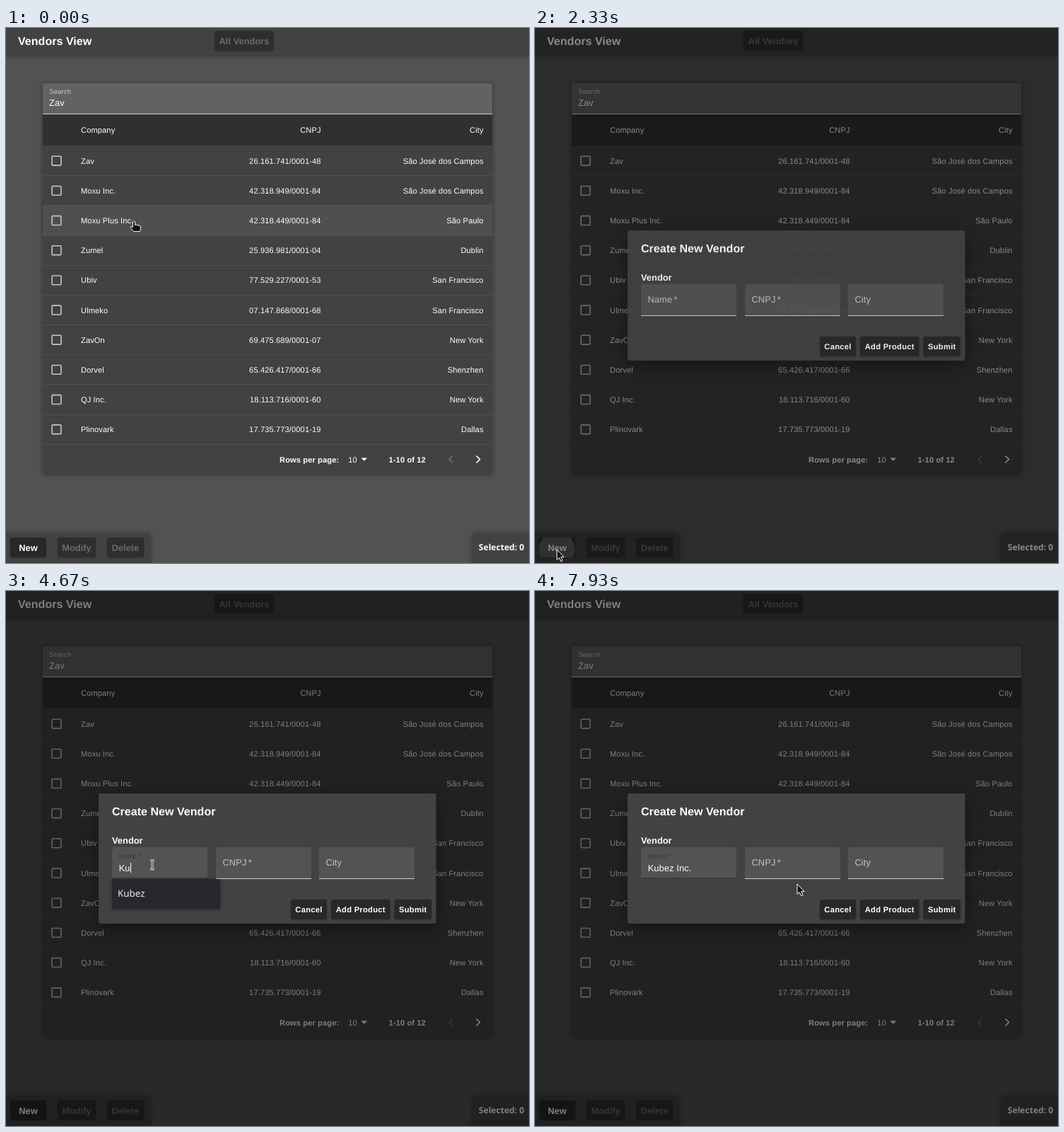
Animation of 740 by 756 pixels, one loop 8000 ms. Source, as an HTML page:

```html
<!DOCTYPE html>
<html lang="en">
<head>
<meta charset="utf-8">
<title>Vendors View</title>
<style>
html, body { margin: 0; width: 100%; height: 100%; overflow: hidden; background: #525252; }
svg { display: block; width: 740px; height: 756px; }
text {
  font-family: "Liberation Sans", Arial, sans-serif;
  font-size: 11.1px; letter-spacing: .12px; fill: #fff;
  text-rendering: geometricPrecision; white-space: pre;
}
.end { text-anchor: end; }
.mid { text-anchor: middle; }
.bold { font-weight: 700; }
.title { font-size: 16px; font-weight: 700; letter-spacing: .04px; }
.input { font-size: 12.8px; }
.small { font-size: 9.6px; fill: #cbcbcb; }
.big { font-size: 12.8px; font-weight: 700; letter-spacing: .04px; }
.act { font-size: 11.2px; font-weight: 700; letter-spacing: .27px; }
.off { fill: #6b6b6b; }
.count { font: 600 12.1px "Noto Sans", sans-serif; letter-spacing: 0; }
.list text { font: 13.4px "Noto Sans", sans-serif; letter-spacing: 0; fill: #ececec; }
.panel { fill: #424242; filter: drop-shadow(0 1px 3px rgba(0,0,0,.4)); }
.dialog { fill: #424242; filter: drop-shadow(0 7px 12px rgba(0,0,0,.4)); }
.btn { fill: #282828; filter: drop-shadow(0 1px 1px rgba(0,0,0,.2)); }
.btn.dim { fill: #2e2e2e; }
.box { fill: none; stroke: #c6c6c6; stroke-width: 1.6; }
.pop { fill: #26282d; filter: drop-shadow(0 1px 2px rgba(0,0,0,.4)); }
</style>
</head>
<body>
<svg viewBox="0 0 740 756" xmlns="http://www.w3.org/2000/svg">
  <defs><clipPath id="newClip"><rect x="6" y="720" width="51" height="28" rx="3"/></clipPath></defs>
  <rect width="740" height="756" fill="#525252"/>
  <g id="page"></g>
  <g clip-path="url(#newClip)"><circle id="ripple" cx="31" cy="737" fill="#fff"/></g>
  <text class="big mid" x="31.5" y="738.6">New</text>
  <rect id="shade" width="740" height="756"/>
  <g id="modal"></g>
  <g id="list" class="list"></g>
  <g id="cursor">
    <path id="arrow" d="M0,0V14.5L3.3,11.6 5.6,16.8 8,15.8 5.8,10.6H10Z" fill="#111" stroke="#fff" stroke-linejoin="round"/>
    <path id="hand" d="M-1.6,1Q0,-1.4 1.6,1V5.5Q3.2,4.4 4.5,5.8 6,5 7,6.4 9,5.8 9.5,7.6V11L8,14.6H0L-4.6,9.4Q-5,7.2 -3,7.4L-1.6,8.5Z" fill="#111" stroke="#fff" stroke-linejoin="round"/>
    <g id="beam" fill="none">
      <path d="M-3,-6H-1.2L0,-4.8 1.2,-6H3M0,-4.8V4.8M-3,6H-1.2L0,4.8 1.2,6H3" stroke="#f2f2f2" stroke-width="2.8"/>
      <path d="M-3,-6H-1.2L0,-4.8 1.2,-6H3M0,-4.8V4.8M-3,6H-1.2L0,4.8 1.2,6H3" stroke="#222"/>
    </g>
  </g>
</svg>
<script>
const $ = id => document.getElementById(id);
const text = (x, y, s, cls = '') => `<text class="${cls}" x="${x}" y="${y}">${s}</text>`;
const rect = (x, y, w, h, attrs) => `<rect x="${x}" y="${y}" width="${w}" height="${h}" ${attrs}/>`;
const button = (x, y, w, label, kind, off = '') =>
  rect(x, y, w, 28, `rx="3" class="btn ${off && 'dim'}"`) +
  text(x + w / 2, y + (kind === 'big' ? 18.6 : 17.6), label, `${kind} mid ${off}`);

const ROW = 42.17, TOP = 166.6;
const rows = [
  ['Zav', '26.161.741/0001-48', 'São José dos Campos'],
  ['Moxu Inc.', '42.318.949/0001-84', 'São José dos Campos'],
  ['Moxu Plus Inc.', '42.318.449/0001-84', 'São Paulo'],
  ['Zumel', '25.936.981/0001-04', 'Dublin'],
  ['Ubiv', '77.529.227/0001-53', 'San Francisco'],
  ['Ulmeko', '07.147.868/0001-68', 'San Francisco'],
  ['ZavOn', '69.475.689/0001-07', 'New York'],
  ['Dorvel', '65.426.417/0001-66', 'Shenzhen'],
  ['QJ Inc.', '18.113.716/0001-60', 'New York'],
  ['Plinovark', '17.735.773/0001-19', 'Dallas']
];
const cells = (y, [a, b, c]) =>
  text(106, y, a) + text(445.6, y, b, 'end') + text(675.6, y, c, 'end');

function pageMarkup() {
  let s = rect(-9, -9, 758, 47, 'class="panel"') + text(17, 24, 'Vendors View', 'title') +
    button(295, 4, 84, 'All Vendors', 'big', 'off') +
    rect(52, 78, 636, 552, 'rx="3" class="panel"') +
    '<path d="M52,122V81q0,-3 3,-3H685q3,0 3,3V122Z" fill="#626262"/>' +
    text(61, 93, 'Search', 'small') + text(61, 110.4, 'Zav', 'input') +
    rect(52, 122, 636, 44, 'fill="#303030"') + rect(52, 121, 636, 1, 'fill="#d4d4d4"') +
    cells(148, ['Company', 'CNPJ', 'City']) +
    rect(52, 0, 636, 42, 'id="hover" fill="#4f4f4f"');
  rows.forEach((row, i) => {
    const mid = 187.7 + ROW * i;
    s += rect(65.1, mid - 6.4, 12.8, 12.8, 'rx="1" class="box"') + cells(mid + 4, row) +
      rect(52, Math.round(TOP - .6 + ROW * (i + 1)), 636, 1, 'fill="#515151"');
  });
  return s + text(387, 613.5, 'Rows per page:', 'bold') + text(484.3, 613.5, '10') +
    '<path d="M502.5,607.4h8.6l-4.3,4.3z" fill="#fff"/>' +
    text(541.5, 613.5, '1-10 of 12', 'bold') +
    '<path d="M632,604.5l-5,5 5,5" fill="none" stroke="#707070" stroke-width="1.6"/>' +
    '<path d="M665.5,604.5l5,5 -5,5" fill="none" stroke="#fff" stroke-width="1.6"/>' +
    rect(-9, 713, 213, 60, 'rx="6" class="panel"') +
    rect(660, 713, 90, 60, 'rx="6" class="panel"') +
    button(6, 720, 51, '', 'big') + button(73, 720, 54, 'Modify', 'big', 'off') +
    button(143, 720, 52, 'Delete', 'big', 'off') + text(733.3, 738, 'Selected: 0', 'count end');
}

const fieldX = [150, 297, 443];
const star = '<tspan dx="2.4">*</tspan>';
function modalMarkup() {
  let s = rect(131, 286, 477.5, 184, 'rx="3" class="dialog"') +
    text(150, 317, 'Create New Vendor', 'title') + text(150, 356.8, 'Vendor', 'big');
  ['Name' + star, 'CNPJ' + star, 'City'].forEach((label, i) => {
    const x = fieldX[i];
    s += `<path id="field${i}" d="M${x},407v-42q0,-3 3,-3h129q3,0 3,3v42z"/>` +
      rect(x, 406, 135, 1, `id="line${i}"`) +
      `<text id="label${i}" class="input" fill="#c4c4c4" style="fill:#c4c4c4" transform="translate(${x + 9.5} 388.4)">${label}</text>`;
  });
  return s + text(159.7, 395.6, '', 'input typed') +
    rect(0, 384, 1, 14, 'id="caret" fill="#fff"') +
    button(403, 436, 51, 'Cancel', 'act') + button(460, 436, 83.5, 'Add Product', 'act') +
    button(549.5, 436, 52.5, 'Submit', 'act');
}
$('page').innerHTML = pageMarkup();
$('modal').innerHTML = modalMarkup();
const typed = document.querySelector('.typed');

const WORD = 'Kubez Inc.';
const KEYS = [4467, 4667, 4933, 5067, 5467, 6000, 6333, 6667, 6800, 7000];
const FOCUS = 3200;
const PATH = [
  [270, 181, 273], [500, 170, 310], [700, 130, 440], [900, 72, 615], [1133, 24, 733], [1200, 31, 737],
  [2400, 31, 737], [2600, 110, 650], [2867, 345, 440], [2933, 372, 400], [3000, 340, 392], [3200, 207, 387],
  [7533, 207, 387], [7600, 245, 402], [7733, 446, 473], [7800, 437, 461], [7933, 371, 414]
];
const FADE = [[2200, 0], [2267, .12], [2333, .93], [2400, 1]];
const POPUP = [[3200, 0], [3267, 1], [5467, 1], [5600, 0]];
const names = ['Nilo do Trevo Sul', 'dd', 'Nilo Do Trevo Sul', 'Hat', 'Nilo do Trevo Su', 'Trunel'];
const options = n => n === 0 ? names : n === 1 ? ['Kubez', 'Kit', 'Kettle'] : ['Kubez'];

const clamp = v => Math.min(1, Math.max(0, v));
// Linear interpolation through [time, ...values] stops.
function track(stops, t) {
  const i = stops.findIndex(s => s[0] > t);
  if (i === 0) return stops[0].slice(1);
  if (i < 0) return stops[stops.length - 1].slice(1);
  const a = stops[i - 1], b = stops[i], p = (t - a[0]) / (b[0] - a[0]);
  return a.slice(1).map((v, k) => v + (b[k + 1] - v) * p);
}
// cubic-bezier(.4, 0, .2, 1)
function ease(p) {
  let lo = 0, hi = 1, u = .5;
  for (let i = 0; i < 18; i++) {
    u = (lo + hi) / 2;
    const x = 1.2 * u * (1 - u) ** 2 + .6 * u * u * (1 - u) + u ** 3;
    if (x < p) lo = u; else hi = u;
  }
  return 3 * u * u * (1 - u) + u ** 3;
}
const show = (el, on) => { el.style.display = on ? '' : 'none'; };

function drawCursor(t, open) {
  const [x, y] = track(PATH, t);
  const row = Math.floor((y - TOP) / ROW);
  const onRow = !open && x > 52 && x < 688 && row >= 0 && row < 10;
  const field = open && y > 362 && y < 407 ? fieldX.findIndex(f => x > f && x < f + 135) : -1;
  $('cursor').setAttribute('transform', `translate(${Math.round(x)} ${Math.round(y)})`);
  show($('hand'), onRow);
  show($('beam'), field >= 0);
  show($('arrow'), !onRow && field < 0);
  show($('hover'), onRow);
  if (onRow) $('hover').setAttribute('y', Math.round(TOP + ROW * row));
  return field;
}

function drawFields(t, hovered) {
  const focused = t >= FOCUS;
  fieldX.forEach((x, i) => {
    const active = i === 0 && focused, hot = i === hovered && !active;
    const line = $('line' + i);
    $('field' + i).setAttribute('fill', hot ? '#5b5b5b' : '#535353');
    line.setAttribute('fill', active ? '#3e3e3e' : hot ? '#fff' : '#d0d0d0');
    line.setAttribute('y', active ? 405 : 406);
    line.setAttribute('height', active ? 2 : 1);
  });
  const p = ease(clamp((t - FOCUS) / 200));
  $('label0').setAttribute('transform', `translate(159.5 ${388.4 - 10.2 * p}) scale(${1 - .25 * p})`);
  $('label0').style.fill = focused ? '#373737' : '#c4c4c4';
}

let listed = -1;
function drawInput(t) {
  const n = KEYS.filter(k => k <= t).length;
  typed.textContent = WORD.slice(0, n);
  const end = n ? typed.getComputedTextLength() : 0;
  $('caret').setAttribute('x', Math.round(159.7 + end));
  show($('caret'), (t >= FOCUS && t < 3800) || (t >= KEYS[0] && t < 7600));
  $('list').style.opacity = track(POPUP, t)[0];
  const state = Math.min(n, 2);
  if (state === listed) return;
  listed = state;
  const items = options(state);
  $('list').innerHTML = rect(150, 407, 153, 42 + 28.7 * (items.length - 1), 'class="pop"') +
    items.map((s, i) => text(158, 432.2 + 28.7 * i, s)).join('');
}

function frame(now) {
  const t = Math.round(Math.floor((now % 8000 + 5) * .015) * 200 / 3) % 8000;
  const [fade] = track(FADE, t);
  $('shade').style.opacity = fade / 2;
  $('modal').style.opacity = fade;
  $('ripple').setAttribute('r', 31.6 * ease(clamp((t - 2042) / 550)));
  $('ripple').style.opacity = .3 * (1 - clamp((t - 2200) / 550));
  drawFields(t, drawCursor(t, fade > 0));
  drawInput(t);
  requestAnimationFrame(frame);
}
frame(performance.now());
</script>
</body>
</html>
```
